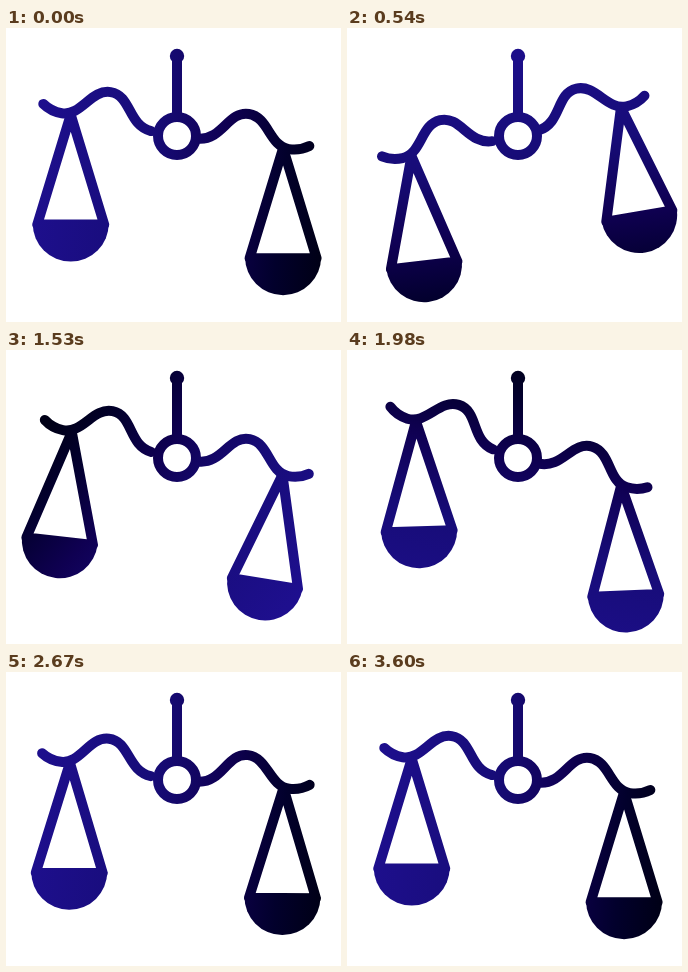
Recreate the animation shown at these times as an HTML page with a canvas. Size 335 px wide and 294 px high, loop 3630 ms.

```html
<!DOCTYPE html>
<html lang="en">
<head>
<meta charset="utf-8">
<title>Balance scales</title>
<style>
  html, body { margin: 0; width: 100%; height: 100%; overflow: hidden; background: #fff; }
  canvas { display: block; }
</style>
</head>
<body>
<canvas id="stage" width="335" height="294"></canvas>
<script>
const W = 335, H = 294, LOOP = 3630, TURN = 2550, RAD = Math.PI / 180;
const PIVOT = { x: 171, y: 108 };
const ctx = document.getElementById('stage').getContext('2d');

const wave = new Path2D('M24 -0.8 C48 -3 49 -33 70 -33 C90 -33 95 -4.5 115 -4.5 C122 -4.5 128 -6 134.7 -10.8');
const strings = new Path2D('M0 0 L-33.5 110 L33.5 110 Z');
const bowl = new Path2D('M-38 109 A38 38 0 0 0 38 109 Z');

// Resting points of the beam: [ms, degrees]
const rests = [[0, 9], [820, -19.7], [1840, 18.5], [2480, 6.4], [3240, 9]];

function ease(u) {
  const a = u ** 1.8, b = (1 - u) ** 1.8;
  return a / (a + b);
}

function tilt(t) {
  const next = rests.findIndex(([ms]) => ms > t);
  if (next < 1) return 9;
  const [t0, a] = rests[next - 1], [t1, b] = rests[next];
  return a + (b - a) * ease((t - t0) / (t1 - t0));
}

// The pans trail behind in proportion to the beam's recent speed
const sway = t => 2.45 * (tilt(t) - tilt(Math.max(0, t - 50)));

function disc(x, y, r) {
  ctx.beginPath();
  ctx.arc(x, y, r, 0, 2 * Math.PI);
}

function drawStand() {
  ctx.beginPath();
  ctx.moveTo(PIVOT.x, 28);
  ctx.lineTo(PIVOT.x, 89);
  ctx.stroke();
  disc(PIVOT.x, 28, 7.2);
  ctx.fill();
  disc(PIVOT.x, PIVOT.y, 19);
  ctx.stroke();
}

function drawSide(side, beamAngle, panAngle) {
  ctx.save();
  ctx.translate(PIVOT.x, PIVOT.y);
  ctx.rotate(beamAngle);

  ctx.save();
  ctx.translate(-2.4, 0);
  ctx.scale(side, 1);
  ctx.stroke(wave);
  ctx.restore();

  ctx.translate(side * 107.5 - 0.8, -4.5);
  ctx.rotate(panAngle - beamAngle);
  ctx.stroke(strings);
  ctx.fill(bowl);
  ctx.restore();
}

// Colours everything drawn so far with one turning gradient
function paint(angle) {
  const dx = -150 * Math.cos(angle), dy = -150 * Math.sin(angle);
  const g = ctx.createLinearGradient(171 + dx, 155 + dy, 171 - dx, 155 - dy);
  g.addColorStop(0, '#1e0f8e');
  g.addColorStop(0.4, '#170c78');
  g.addColorStop(0.65, '#0f0052');
  g.addColorStop(0.85, '#02002c');
  g.addColorStop(1, '#000016');
  ctx.globalCompositeOperation = 'source-in';
  ctx.fillStyle = g;
  ctx.fillRect(0, 0, W, H);
  ctx.globalCompositeOperation = 'source-over';
}

function frame() {
  const t = performance.now() % LOOP;
  const beam = tilt(t) * RAD, pan = sway(t) * RAD;
  ctx.clearRect(0, 0, W, H);
  ctx.lineWidth = 10;
  ctx.lineCap = ctx.lineJoin = 'round';
  drawStand();
  drawSide(-1, beam, pan);
  drawSide(1, beam, pan * 1.45);
  paint((5 + 360 * Math.min(1, t / TURN)) * RAD);
  requestAnimationFrame(frame);
}
frame();
</script>
</body>
</html>
```
